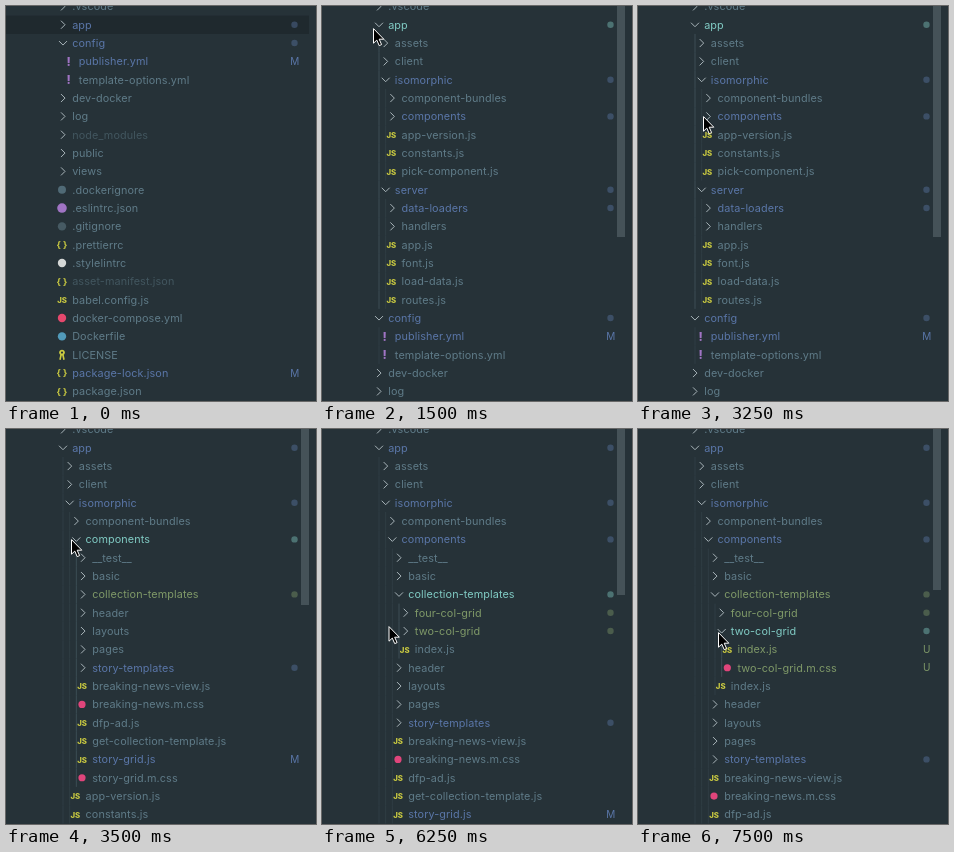
Write an HTML page that moves like this. It is 310 by 395 pixels and loops after 8 s.

```html
<!DOCTYPE html>
<html lang="en">
<head>
<meta charset="utf-8">
<title>File tree</title>
<style>
  html, body { margin: 0; width: 100%; height: 100%; overflow: hidden; background: #263238; }
  svg { display: block; width: 310px; height: 395px; }
  text { font-family: Inter, "Open Sans", sans-serif; font-size: 10.83px; white-space: pre; }
  .label { letter-spacing: .1px; }
</style>
</head>
<body>
<svg viewBox="0 0 310 395">
  <g id="tree"></g>
  <rect id="bar" x="295" y="0" width="8" fill="#455258"/>
  <path id="cursor" d="M0.5 0.6V15.2L3.8 12.1L6.2 17.6L8.6 16.6L6.2 11.2H10.8Z"
    fill="#000" stroke="#fff" stroke-width="1" stroke-linejoin="round"/>
</svg>
<script>
const LOOP = 8000, SCALE = 5 / 6, ROW = 22 * SCALE, INDENT = 8 * SCALE, TOP = 0.4, VISIBLE = 22;
const COLOR = {
  plain: '#5f7b88', '*': '#5a76a8', '+': '#7f9968', '~': '#42565f',
  selected: '#80cbc4', hover: '#ffffff'
};

// Two spaces per level; "/" folder, "*" modified, "+" untracked, "~" ignored
const SOURCE = `
.vscode/
app/*
  assets/
  client/
  isomorphic/*
    component-bundles/
    components/*
      __test__/
      basic/
      collection-templates/+
        four-col-grid/+
        two-col-grid/+
          index.js+
          two-col-grid.m.css+
        index.js
      header/
      layouts/
      pages/
      story-templates/*
      breaking-news-view.js
      breaking-news.m.css
      dfp-ad.js
      get-collection-template.js
      story-grid.js*
      story-grid.m.css
    app-version.js
    constants.js
    pick-component.js
  server/*
    data-loaders/*
    handlers/
    app.js
    font.js
    load-data.js
    routes.js
config/*
  publisher.yml*
  template-options.yml
dev-docker/
log/
node_modules/~
public/
views/
.dockerignore
.eslintrc.json
.gitignore
.prettierrc
.stylelintrc
asset-manifest.json~
babel.config.js
docker-compose.yml
Dockerfile
LICENSE
package-lock.json*
package.json`;

const path = [];
const nodes = SOURCE.trim().split('\n').map(line => {
  const [, pad, name, slash, status] = line.match(/^( *)(.*?)(\/?)([*+~]?)$/);
  const depth = pad.length / 2;
  path.length = depth;
  const node = { name, depth, status, folder: slash === '/', parents: path.slice() };
  path.push(name);
  return node;
});

// Folders opened by each click
const clicks = [
  { at: 1500, name: 'app', bar: 231 },
  { at: 3500, name: 'components', bar: 176 },
  { at: 5250, name: 'collection-templates', bar: 166 },
  { at: 7500, name: 'two-col-grid', bar: 161 }
];
const FOCUS = 1250, HOVER = [2250, 3000];
const moves = [
  [250, 155, 101], [500, 88, 56], [750, 51, 20], [1000, 51, 21], [1250, 51, 22],
  [2000, 55, 36], [2250, 59.5, 87], [2750, 63, 102], [3000, 64, 103], [3250, 65, 110],
  [4250, 69, 171], [4500, 70, 171.5], [4750, 71, 169], [5000, 73, 168],
  [6250, 66.5, 197], [6500, 69, 205], [6750, 81, 206.5], [7000, 80.5, 205], [7250, 80, 203]
];
const ticks = [...new Set([0, ...moves.map(m => m[0]), ...clicks.map(c => c.at)])].sort((a, b) => a - b);

const glyph = (x, y, s, fill, size, weight = 700) =>
  `<text x="${x}" y="${y}" text-anchor="middle" fill="${fill}" style="font-size:${size}px;font-weight:${weight}">${s}</text>`;
const disc = (x, y, r, fill) => `<circle cx="${x}" cy="${y}" r="${r}" fill="${fill}"/>`;

function icon(name, x, y) {
  if (name === '.dockerignore') return disc(x, y, 4, '#506a76');
  if (name === 'docker-compose.yml') return disc(x, y, 4.2, '#e5486d');
  if (name === 'Dockerfile') return disc(x, y, 4.2, '#519aba');
  if (name === '.eslintrc.json') return disc(x, y, 4.8, '#a074c4');
  if (name === '.gitignore') return disc(x, y, 4.2, '#465a63');
  if (name === '.stylelintrc') return disc(x, y, 4.2, '#d4d7d6');
  if (name.endsWith('.css')) return disc(x, y, 3.6, '#e0457b');
  if (name.endsWith('.yml')) return glyph(x, y + 4.3, '!', '#a074c4', 12, 800);
  if (name.endsWith('.js')) return glyph(x, y + 3.2, 'JS', '#cbcb41', 7.8, 800);
  if (name === 'LICENSE') {
    return `<g fill="none" stroke="#cbcb41" transform="translate(${x} ${y})">
      <circle cy="-2.2" r="2" stroke-width="1.8"/><path d="M-.9 0L-2 5M.9 0L2 5" stroke-width="1.6"/></g>`;
  }
  return glyph(x, y + 3.2, '{ }', '#cbcb41', 9.2);
}

function chevron(x, y, open) {
  const d = open ? 'm-4 -2l4 4l4 -4' : 'm-2 -4l4 4l-4 4';
  return `<path d="M${x} ${y}${d}" fill="none" stroke="#a9b5ba" stroke-width="1"/>`;
}

function drawRow(node, i, view) {
  const y = TOP + ROW * i, shift = INDENT * node.depth;
  const selected = node.name === view.selected;
  const color = selected ? COLOR.selected
    : node.name === view.hover ? COLOR.hover
    : COLOR[node.status || 'plain'];
  let out = '';
  if (view.focused) {
    node.parents.forEach((p, k) => {
      const x = 57 + INDENT * k;
      out += `<path d="M${x} ${y - ROW / 2}v${ROW}" stroke="${p === view.selected ? '#3c4d55' : '#2f3d44'}"/>`;
    });
  } else if (node.name === 'app') {
    out += `<rect y="${y - ROW / 2}" width="303" height="${ROW}" fill="#1f292e"/>`;
  }
  out += node.folder
    ? chevron(57 + shift, y, view.open.has(node.name))
    : icon(node.name, 56 + shift, y);
  out += `<text class="label" x="${66.2 + shift}" y="${y + 3.9}" fill="${color}">${node.name}</text>`;
  if (node.status && node.status !== '~') {
    out += node.folder
      ? `<g opacity=".42">${disc(288.5, y, 3.2, color)}</g>`
      : glyph(288.7, y + 3.6, node.status === '*' ? 'M' : 'U', color, 10, 400);
  }
  return out;
}

const byId = id => document.getElementById(id);
const latest = (list, t, key) => list.filter(e => e[key] <= t).pop();

function draw(t) {
  const done = clicks.filter(c => c.at <= t);
  const last = done[done.length - 1];
  const focused = t >= FOCUS;
  const view = {
    focused,
    open: new Set(['isomorphic', 'server', 'config', ...done.map(c => c.name)]),
    selected: last ? last.name : focused ? 'app' : '',
    hover: t >= HOVER[0] && t < HOVER[1] ? 'component-bundles' : ''
  };
  byId('tree').innerHTML = nodes
    .filter(n => n.parents.every(p => view.open.has(p)))
    .slice(0, VISIBLE)
    .map((n, i) => drawRow(n, i, view))
    .join('');
  byId('bar').setAttribute('height', last ? last.bar : 0);

  const spot = latest(moves, t, 0);
  byId('cursor').setAttribute('visibility', spot ? 'visible' : 'hidden');
  if (spot) byId('cursor').setAttribute('transform', `translate(${spot[1]} ${spot[2]})`);
}

let shown = -1;
const start = performance.now();
function frame() {
  const t = (performance.now() - start) % LOOP;
  const tick = ticks.filter(v => v <= t).pop();
  if (tick !== shown) draw(shown = tick);
  requestAnimationFrame(frame);
}
frame();
</script>
</body>
</html>
```
